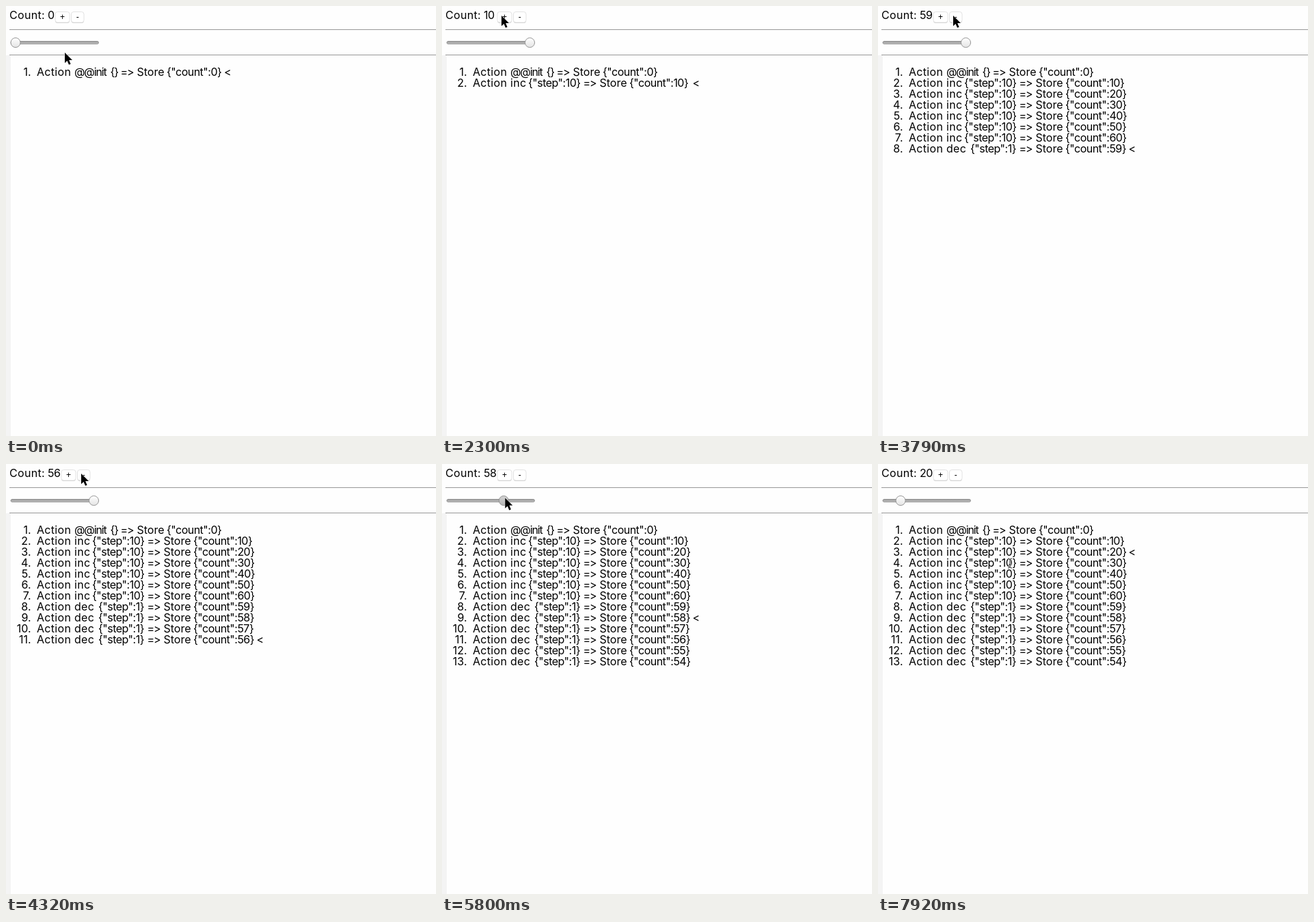
Animation, 629 px wide and 628 px high, one loop 8 s. Source, as an HTML page:

```html
<!DOCTYPE html>
<html lang="en">
<head>
<meta charset="utf-8">
<title>Counter with action history</title>
<style>
  html, body { margin: 0; width: 100%; height: 100%; overflow: hidden; background: #fefefe; }
  svg { display: block; width: 629px; height: 628px; }
  text { font: 16px Inter, "Open Sans", sans-serif; fill: #000; white-space: pre; }
  .loose { letter-spacing: .02em; }
  .json { letter-spacing: -.032em; }
  .tight { letter-spacing: -.07em; }
  .num { text-anchor: end; }
  .label { font: 12px "Liberation Sans", Arial, sans-serif; text-anchor: middle; }
</style>
</head>
<body>
<svg id="stage" viewBox="0 0 629 628" xmlns="http://www.w3.org/2000/svg">
  <defs>
    <linearGradient id="blue" x2="0" y2="1"><stop stop-color="#4b9bfb"/><stop offset="1" stop-color="#0a60f2"/></linearGradient>
    <linearGradient id="knob" x2="0" y2="1"><stop stop-color="#fff"/><stop offset="1" stop-color="#e4e4e4"/></linearGradient>
    <linearGradient id="held" x2="0" y2="1"><stop stop-color="#d2d2d2"/><stop offset="1" stop-color="#b4b4b4"/></linearGradient>
    <linearGradient id="rail" x2="0" y2="1"><stop stop-color="#929292"/><stop offset="1" stop-color="#c9c9c9"/></linearGradient>
    <path id="caret" d="M-3-7Q0-7 0-5Q0-7 3-7M0-5V5M-3 7Q0 7 0 5Q0 7 3 7M-2 2H2"/>
  </defs>
  <rect width="629" height="628" fill="#fefefe"/>
  <rect y="72" width="7" height="556" fill="#f4f4f4"/>
  <path d="M5 34.5H629M5 71.5H629" stroke="#989898"/>
  <text x="5" y="19" class="loose">Count:</text>
  <text id="count" x="61" y="19" class="json"></text>
  <g id="buttons"></g>
  <rect x="7" y="51.5" width="128.5" height="4" rx="2" fill="url(#rail)" stroke="#8a8a8a" stroke-width=".8"/>
  <circle id="thumb" cy="53.5" r="7" stroke="#8c8c8c" stroke-width=".9"/>
  <g id="log"></g>
  <text id="mark">&lt;</text>
  <path id="arrow" d="M0 0V15.2L3.5 12 6 17.8 8.6 16.7 6.2 11H11Z" stroke="#fff" paint-order="stroke" stroke-linejoin="round"/>
  <g id="beam" fill="none">
    <use href="#caret" stroke="#fff" stroke-width="2.6"/>
    <use href="#caret" stroke="#222"/>
  </g>
</svg>
<script>
const LOOP = 8000, FRAME = 88;
const GRAB = 5370, DROP = 7580, UNDO = 7920;
const INCS = 6, DECS = 6, LAST = INCS + DECS;
const $ = id => document.getElementById(id);
const set = (el, attrs) => { for (const k in attrs) el.setAttribute(k, attrs[k]); };
const show = (el, on) => set(el, { visibility: on ? 'visible' : 'hidden' });
const list = (n, fn) => Array.from({ length: n }, (_, i) => fn(i));

function add(parent, tag, attrs, text) {
  const el = document.createElementNS('http://www.w3.org/2000/svg', tag);
  set(el, attrs);
  if (text) el.textContent = text;
  parent.append(el);
  return el;
}

// Two slow clicks on plus, then steady clicking: one press every second frame
const every = (start, n) => list(n, i => start + i * 2 * FRAME);
const incs = [1410, 2570, ...every(2824, INCS - 2)];
const decs = every(3790, DECS);
const clicks = [...incs, ...decs];

// Count after each action: up by tens, then down by ones
const counts = list(LAST + 1, i => Math.min(i, INCS) * 10 - Math.max(0, i - INCS));

// Pointer moves; bow bends the path sideways
const home = { x: 86, y: 68 };
const moves = [
  { from: 90, to: 480, x: 78, y: 16, bow: -28 },
  { from: 1950, to: 2300, x: 87, y: 14 },
  { from: 3440, to: 3620, x: 110, y: 14 },
  { from: 4760, to: 4850, x: 137, y: 49 },
  { from: 4940, to: 5110, x: 130, y: 50 },
  { from: GRAB, to: 6430, x: 32, y: 49 },
  { from: 6780, to: 7130, x: 90, y: 49 },
  { from: DROP, to: 7750, x: 188, y: 133 },
  { from: UNDO, to: UNDO, x: 193, y: 145 }
];

function pointer(t) {
  let { x, y } = home;
  for (const m of moves) {
    if (t < m.from) break;
    const steps = Math.round((m.to - m.from) / FRAME);
    const done = steps ? Math.floor((t - m.from) / (m.to - m.from) * steps) : 0;
    const f = Math.min(1, (done + 1) / (steps + 1));
    x += (m.x - x) * f + (m.bow || 0) * Math.sin(Math.PI * f);
    y += (m.y - y) * f;
  }
  return [x, y];
}

// History rows
const rowY = i => 102 + 16 * i;
const rows = counts.map((count, i) => {
  const g = add($('log'), 'g', {});
  const word = (x, s, cls) => add(g, 'text', { x, y: rowY(i), class: cls }, s);
  const inc = i <= INCS, end = i ? 206.5 : 167.5;
  word(36.5, i + 1 + '.', 'num');
  word(45, 'Action', 'loose');
  word(100, i ? (inc ? 'inc' : 'dec') : '@@init', i ? 'loose' : 'tight');
  word(i ? (inc ? 126 : 135) : 152.5, i ? `{"step":${inc ? 10 : 1}}` : '{}', i ? 'json' : 'tight');
  word(end, '=>', 'tight');
  word(end + 24, 'Store', '');
  word(end + 67.5, `{"count":${count}}`, 'json');
  return g;
});

function button(x, w, label) {
  const g = add($('buttons'), 'g', {});
  add(g, 'rect', { x, y: 9, width: w, height: 16, rx: 3.5, fill: '#d2d2d2' });
  const face = add(g, 'rect', { x, y: 8.5, width: w, height: 15.5, rx: 3.5, 'stroke-width': .8 });
  add(g, 'text', { x: x + w / 2, y: 20, class: 'label' }, label);
  return on => set(face, { fill: on ? 'url(#blue)' : '#fff', stroke: on ? '#1a66e0' : '#dcdcdc' });
}
const plus = button(72, 21, '+'), minus = button(95.5, 18.5, '-');

function draw(t) {
  const done = clicks.filter(c => t >= c).length;
  const pressed = times => times.some(c => t >= c - FRAME - 2 && t < c);
  const [x, y] = pointer(t);
  const held = t >= GRAB && t < DROP;

  // The slider follows the pointer while held
  const pull = Math.round((Math.min(x, 90 + (held ? LOOP : 0)) - 14) / 9.5);
  const row = t < GRAB ? done : t >= UNDO ? 2 : Math.min(LAST, pull);

  $('count').textContent = counts[row];
  set($('buttons'), { transform: `translate(${counts[row] > 9 ? 9 : 0} 0)` });
  plus(pressed(incs));
  minus(pressed(decs));
  set($('thumb'), { cx: 14 + (done ? 114.5 * row / done : 0), fill: held ? 'url(#held)' : 'url(#knob)' });
  rows.forEach((g, i) => show(g, i <= done));
  set($('mark'), { x: row ? 366.5 : 319, y: rowY(row) });

  const beam = t >= 7750;
  show($('arrow'), !beam);
  show($('beam'), beam);
  set(beam ? $('beam') : $('arrow'), { transform: `translate(${x} ${y})` });
}

function tick() {
  draw((performance.now() + 4) % LOOP);
  requestAnimationFrame(tick);
}
tick();
</script>
</body>
</html>
```
